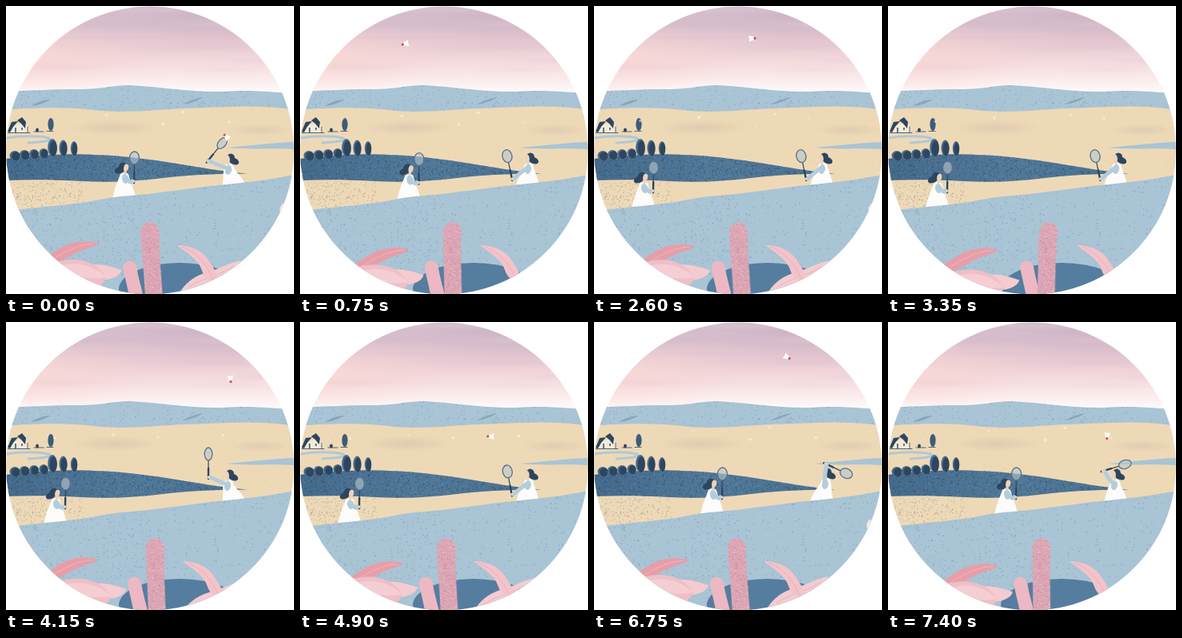
An HTML page with a canvas for the animation above (7450 ms loop, 360 by 360 pixels).

```html
<!DOCTYPE html>
<html lang="en">
<head>
<meta charset="utf-8">
<title>Badminton in the hills</title>
<style>
html, body { margin: 0; width: 100%; height: 100%; overflow: hidden; background: #fff; }
canvas { display: block; width: 360px; height: 360px; }
</style>
</head>
<body>
<canvas id="stage"></canvas>
<script>
const LOOP = 7450, STEP = 50, SIZE = 360, RAD = Math.PI / 180;
const ratio = Math.max(1, window.devicePixelRatio || 1);
const DARK = '#2d465f', WHITE = '#fdfcfb', SLEEVE = '#b3cddd', SKIN = '#efd3b9', HILL = '#a9c4d4';

const clamp = u => Math.min(1, Math.max(0, u));
const mix = (a, b, u) => a + (b - a) * u;
const smooth = u => u * u * (3 - 2 * u);
const glide = (t, from, to) => smooth(clamp((t - from) / (to - from)));

function setup(canvas) {
  canvas.width = canvas.height = SIZE * ratio;
  const c = canvas.getContext('2d');
  c.scale(ratio, ratio);
  c.lineCap = c.lineJoin = 'round';
  return c;
}
const layer = () => setup(document.createElement('canvas'));

function rng(seed) {
  return () => (seed = (seed * 16807) % 2147483647) / 2147483647;
}
function fill(c, color, d) {
  c.fillStyle = color;
  c.fill(new Path2D(d));
}
function line(c, color, width, d) {
  c.strokeStyle = color;
  c.lineWidth = width;
  c.stroke(new Path2D(d));
}
function oval(c, color, x, y, rx, ry, turn = 0) {
  c.fillStyle = color;
  c.beginPath();
  c.ellipse(x, y, rx, ry, turn, 0, 7);
  c.fill();
}
// Scatter grain inside a path; bias > 1 gathers it towards the box's top left.
function grain(c, d, color, n, [x, y, w, h], seed, bias = 1) {
  const rnd = rng(seed);
  c.save();
  c.clip(new Path2D(d));
  c.fillStyle = color;
  for (let i = 0; i < n; i++) {
    const s = 0.5 + rnd() * 0.8;
    c.fillRect(x + w * rnd() ** bias, y + h * rnd() ** bias, s, s);
  }
  c.restore();
}
function softOval(c, color, x, y, rx, ry) {
  c.save();
  c.translate(x, y);
  c.scale(rx, ry);
  const g = c.createRadialGradient(0, 0, 0, 0, 0, 1);
  g.addColorStop(0, color);
  g.addColorStop(1, color.replace(/[\d.]+\)$/, '0)'));
  c.fillStyle = g;
  c.fillRect(-1, -1, 2, 2);
  c.restore();
}
function gradient(c, x0, y0, x1, y1, colors) {
  const g = c.createLinearGradient(x0, y0, x1, y1);
  colors.forEach((color, i) => g.addColorStop(i / (colors.length - 1), color));
  return g;
}

function paintSky(c) {
  c.fillStyle = gradient(c, 200, 0, 200, 108,
    ['#cfb8c9', '#d9c0cd', '#e6c9d2', '#f1d6da', '#f9e7e8', '#fffafa']);
  c.fillRect(0, 0, SIZE, 135);
  softOval(c, 'rgba(250,214,210,0.75)', 30, 66, 150, 48);
  softOval(c, 'rgba(184,156,182,0.28)', 270, 14, 120, 42);
  const rnd = rng(41);
  for (let i = 0; i < 24; i++) {
    const tint = i % 2 ? 'rgba(255,234,234,0.16)' : 'rgba(190,160,186,0.1)';
    softOval(c, tint, rnd() * 360, rnd() * 85, 50 + rnd() * 90, 3 + rnd() * 6);
  }
}

function paintHouse(c) {
  line(c, '#b0c8d6', 3, 'M0 165 C18 162 42 162 53 165 C60 168 48 170 28 171');
  fill(c, '#f4ead8', 'M7 150 L17 147 L27 149 V158 H4 Z');
  fill(c, DARK, 'M2 157 L7 145 L15 144 L9 151 L5 158 Z M14 143 L20 139 L25 145 L24 153 L19 147 Z');
  fill(c, '#5b7690', 'M11 152 h2 v6 h-2 Z M19 152 h2 v3 h-2 Z');
  line(c, DARK, 0.8, 'M2 158.5 H30 M35 157 H47 M27 151 V158');
  oval(c, DARK, 39, 155, 2, 2.5);
  oval(c, '#3d5b78', 56, 148, 3.6, 8);
  line(c, DARK, 0.8, 'M51 156.5 H59');
}

function tree(c, x, y, rx, ry) {
  oval(c, '#4a6b89', x, y, rx, ry);
  oval(c, DARK, x + rx * 0.2, y + ry * 0.1, rx * 0.8, ry * 0.9);
}

function paintBack(c) {
  paintSky(c);
  const far = 'M0 107 C25 106 55 104 90 104 C122 104 132 99 155 99 C195 101 230 108 270 107 C310 104 330 108 360 109 V140 H0 Z';
  fill(c, HILL, far);
  grain(c, far, 'rgba(96,130,163,0.45)', 380, [0, 98, 360, 36], 7);
  fill(c, '#86a5bd', 'M220 123 C227 120 237 115 247 114 C239 118 231 122 220 123 Z M31 125 C38 121 46 117 56 117 C48 121 42 124 31 125 Z');

  const sand = 'M0 130 C30 127 75 126 110 130 C150 135 190 129 225 128 C270 127 315 122 360 130 V260 H0 Z';
  fill(c, '#eed9b7', sand);
  softOval(c, 'rgba(200,184,164,0.4)', 135, 152, 58, 10);
  softOval(c, 'rgba(200,184,164,0.38)', 318, 155, 42, 8);
  grain(c, sand, 'rgba(196,164,122,0.25)', 200, [0, 126, 360, 80], 19);
  fill(c, HILL, 'M275 177 C300 175 330 171 360 170 V179 C335 177 305 180 275 177 Z');
  paintHouse(c);

  const field = 'M0 191 C30 187 80 184 110 186 C150 187 190 193 225 199 C250 203 280 208 302 209.5 C270 210 240 210 205 214 C165 219 130 221 95 219 C60 217 30 217 0 218 Z';
  fill(c, gradient(c, 0, 0, 300, 0, ['#446a8b', '#527999', '#48708f']), field);
  grain(c, field, 'rgba(31,55,84,0.5)', 1000, [0, 185, 290, 36], 23);
  grain(c, field, 'rgba(130,162,188,0.45)', 450, [0, 185, 270, 36], 31);

  for (let i = 0; i < 4; i++) tree(c, 11 + 12 * i, 187 - i, 6.5 - i * 0.3, 6);
  for (let i = 0; i < 3; i++) tree(c, 58 + 13.5 * i, 177 + i * 0.5, 5.8 - i * 0.8, 11 - i);
  grain(c, 'M0 218 H100 V260 H0 Z', 'rgba(120,126,126,0.5)', 300, [8, 219, 95, 40], 53, 1.2);
}

function paintFront(c) {
  const land = 'M0 256 C25 253 55 251 85 247 C115 244 125 239 150 237.5 C195 234 240 226 285 222 C315 219 340 215 360 211 V360 H0 Z';
  fill(c, HILL, land);
  grain(c, land, 'rgba(91,126,160,0.5)', 800, [0, 212, 360, 135], 61);
  grain(c, land, 'rgba(91,126,160,0.45)', 360, [0, 246, 190, 90], 67, 1.4);
  oval(c, '#557d9f', 217, 354, 76, 33);
}

const backdrop = layer(), foreground = layer(), stalk = layer();
paintBack(backdrop);
paintFront(foreground);
const stem = 'M167 283 C167 266 189 266 190 283 C190 310 193 335 195 365 H173 C172 335 168 310 167 283 Z';
fill(stalk, '#dca7b5', stem);
grain(stalk, stem, 'rgba(196,120,146,0.5)', 380, [165, 268, 32, 92], 71);
grain(stalk, stem, 'rgba(247,214,220,0.55)', 300, [165, 268, 32, 92], 73);

// Each shot flies on from where the one before it landed.
const shots = [
  { end: 1850, x: 52, y: 185, lift: 139, drag: 2 },
  { end: 4450, x: 281, y: 163, lift: 198, drag: 3 },
  { end: 6000, x: 190, y: 186, lift: 38, drag: 1.9 },
  { end: LOOP, x: 275, y: 163, lift: 131, drag: 1.3 }
];
function shuttle(c, t) {
  const i = shots.findIndex(s => t < s.end), to = shots[i];
  const from = i ? shots[i - 1] : { ...shots[shots.length - 1], end: 0 };
  const u = (t - from.end) / (to.end - from.end), v = u ** 1.2;
  const x = mix(from.x, to.x, 1 - (1 - u) ** to.drag);
  const y = mix(from.y, to.y, u) - to.lift * 4 * v * (1 - v);
  c.save();
  c.translate(x, y);
  c.scale(Math.sign(to.x - from.x), 1);
  c.rotate(mix(-45, 100, u) * RAD);
  fill(c, WHITE, 'M2 -1.6 L-5 -3.8 Q-4 0 -5 3.8 L2 1.6 Z');
  oval(c, '#c4565f', 2.6, 0, 1.6, 1.6);
  c.restore();
}

// Poses, measured from the feet: neck x, y, hand x, y, racket angle, racket width
const left = {
  idle: [0, -29, 12, -19, 1, 1],
  raise: [-8, -31, -8, -30, 4, 0.6],
  lunge: [11, -32, 14, -6, -58, 0.15],
  hit: [4, -29, 18, -26, 15, 1]
};
const right = {
  idle: [1, -26, -20, -7, -12, 1],
  reach: [-7, -25, -32, -29, 0, 0.8],
  windup: [5, -27, 4, -46, 115, 1],
  hit: [-6, -25, -33, -29, 39, 0.8]
};
const stroke = (who, time, lead, prep) => [
  [time - lead - 600, who.idle], [time - lead, who[prep]], [time, who.hit], [time + 500, who.idle]
];
const leftCues = [...stroke(left, 1850, 350, 'raise'), ...stroke(left, 6000, 350, 'lunge')];
const rightCues = [
  ...stroke(right, 0, 700, 'windup'),
  ...stroke(right, 4450, 300, 'reach'),
  ...stroke(right, LOOP, 700, 'windup')
];
function poseAt(who, cues, t) {
  const i = cues.findIndex(k => k[0] > t);
  if (i < 1) return who.idle;
  const [t0, a] = cues[i - 1], [t1, b] = cues[i], u = (t - t0) / (t1 - t0);
  const e = b === who.hit ? u ** 8 : smooth(u);
  return a.map((v, k) => mix(v, b[k], e));
}

function racket(c, x, y, angle, width) {
  c.save();
  c.translate(x, y);
  c.rotate(angle * RAD);
  line(c, DARK, 2.4, 'M0 2 V-11');
  line(c, DARK, 1.2, 'M0 -11 V-21');
  oval(c, 'rgba(184,198,206,0.6)', 0, -29, 6 * width, 8);
  c.strokeStyle = '#58718a';
  c.lineWidth = 1.3;
  c.stroke();
  c.restore();
}

function player(c, fx, fy, [dx, dy, rx, ry, angle, width], dir) {
  const nx = fx + dx, ny = fy + dy, hx = fx + rx, hy = fy + ry, base = fy + 4;
  const sx = nx + dir * 2, sy = ny + 5;
  oval(c, DARK, nx - dir * 6, ny - 4, 6.5, 4, dir * -0.4);
  oval(c, DARK, nx - dir * 2, ny - 8, 5, 5.5);
  fill(c, WHITE, `M${nx - 5} ${ny + 1} Q${nx} ${ny - 3} ${nx + 5} ${ny + 1}
    C${nx + 8} ${ny + 12} ${fx + 11} ${fy - 12} ${fx + 15} ${base}
    H${fx - 15} C${fx - 12} ${fy - 12} ${nx - 9} ${ny + 12} ${nx - 5} ${ny + 1} Z`);
  line(c, SKIN, 3, `M${nx + dir} ${ny - 4} V${ny}`);
  oval(c, SKIN, nx + dir * 2.2, ny - 7, 3, 4.4, dir * 0.2);
  racket(c, hx, hy, angle, width);
  const sag = Math.max(0, 24 - Math.hypot(hx - sx, hy - sy)) * 0.5;
  line(c, SLEEVE, 5, `M${sx} ${sy} Q${(sx + hx) / 2} ${(sy + hy) / 2 + sag} ${hx - dir * 2} ${hy}`);
  oval(c, SLEEVE, nx + dir, ny + 7, 4, 6, dir * -0.2);
  oval(c, SKIN, hx, hy, 1.6, 1.6);
}
function players(c, t) {
  const x = 148 - 86 * (glide(t, 450, 1750) - glide(t, 5000, 6000));
  player(c, x, 238 + (148 - x) * 0.14, poseAt(left, leftCues, t), 1);
  player(c, 285, 223, poseAt(right, rightCues, t), -1);
}

function specks(c, t) {
  const rnd = rng(97);
  for (let i = 0; i < 5; i++) {
    const x = 60 + rnd() * 240, y = 128 + rnd() * 22, d = ((t / LOOP + i / 5) % 1) * 2 - 1;
    oval(c, `rgba(255,252,245,${0.6 * (1 - d * d)})`, x + d * 8, y + d * 4, 1.6, 1.6);
  }
}

const sway = (t, lead) => (1 - Math.cos((0.1635 * t - 30 + lead) * RAD)) / 2;
function moved(c, x, y, draw) {
  c.save();
  c.translate(x, y);
  draw();
  c.restore();
}
function plants(c, t) {
  const s = sway(t, 0), l = sway(t, 50);
  moved(c, 2 + 24 * l, 2 + 9 * l, () => {
    fill(c, '#e79ea8', 'M114 295 C98 289 78 292 62 302 C52 308 43 315 32 319 L40 326 C58 323 64 317 76 311 C89 303 101 301 114 295 Z');
    line(c, 'rgba(246,196,202,0.6)', 1, 'M106 295 C84 296 66 308 46 320');
  });
  moved(c, 22 * s, 14 * s, () => {
    fill(c, '#f4cbd0', 'M95 325 C112 318 130 325 143 329 C140 340 122 344 100 340 Z');
    fill(c, '#efbfc8', 'M20 331 C52 321 74 313 92 317 C108 320 118 328 124 338 C118 352 100 362 80 366 L10 345 Z');
    fill(c, '#f4ced3', 'M46 333 C66 319 90 319 106 326 C116 331 120 334 124 338 C104 342 76 336 46 333 Z');
  });
  moved(c, 21 * s, 0, () => {
    fill(c, '#ecb8c3', 'M145 327 C145 316 161 316 162 327 C164 340 168 352 171 366 H153 C151 352 147 340 145 327 Z');
  });
  c.save();
  c.transform(1, 0, -0.11 * s, 1, 54 * s, 0);
  c.drawImage(stalk.canvas, 0, 0, SIZE, SIZE);
  c.restore();
  moved(c, 10 * s, 48 * s * s, () => {
    fill(c, '#f3ccd2', 'M217 357 C226 343 238 336 252 332 C268 328 279 320 293 318 C287 333 276 342 262 346 C248 350 235 353 217 357 Z');
    line(c, 'rgba(222,160,174,0.6)', 1, 'M228 351 C246 339 266 337 284 325');
  });
  moved(c, 25 * s, 0, () => {
    fill(c, '#f3c3ca', 'M212 299 C230 299 245 307 251 317 C257 326 266 338 263 350 C254 344 246 340 243 330 C239 317 225 309 212 299 Z');
    line(c, 'rgba(225,160,174,0.6)', 1, 'M219 301 C237 309 248 321 258 343');
  });
  oval(c, '#f8e6ea', 344 + 22 * s, 253, 3, 6, 0.2);
}

const ctx = setup(document.getElementById('stage'));
function draw(t) {
  const c = ctx;
  c.fillStyle = '#fff';
  c.fillRect(0, 0, SIZE, SIZE);
  c.save();
  c.beginPath();
  c.arc(180, 180.5, 180, 0, 7);
  c.clip();
  c.drawImage(backdrop.canvas, 0, 0, SIZE, SIZE);
  players(c, t);
  c.drawImage(foreground.canvas, 0, 0, SIZE, SIZE);
  shuttle(c, t);
  plants(c, t);
  specks(c, t);
  c.restore();
}

const start = performance.now();
function tick() {
  const t = (performance.now() - start) % LOOP;
  draw(Math.floor(t / STEP) * STEP);
  requestAnimationFrame(tick);
}
tick();
</script>
</body>
</html>
```
